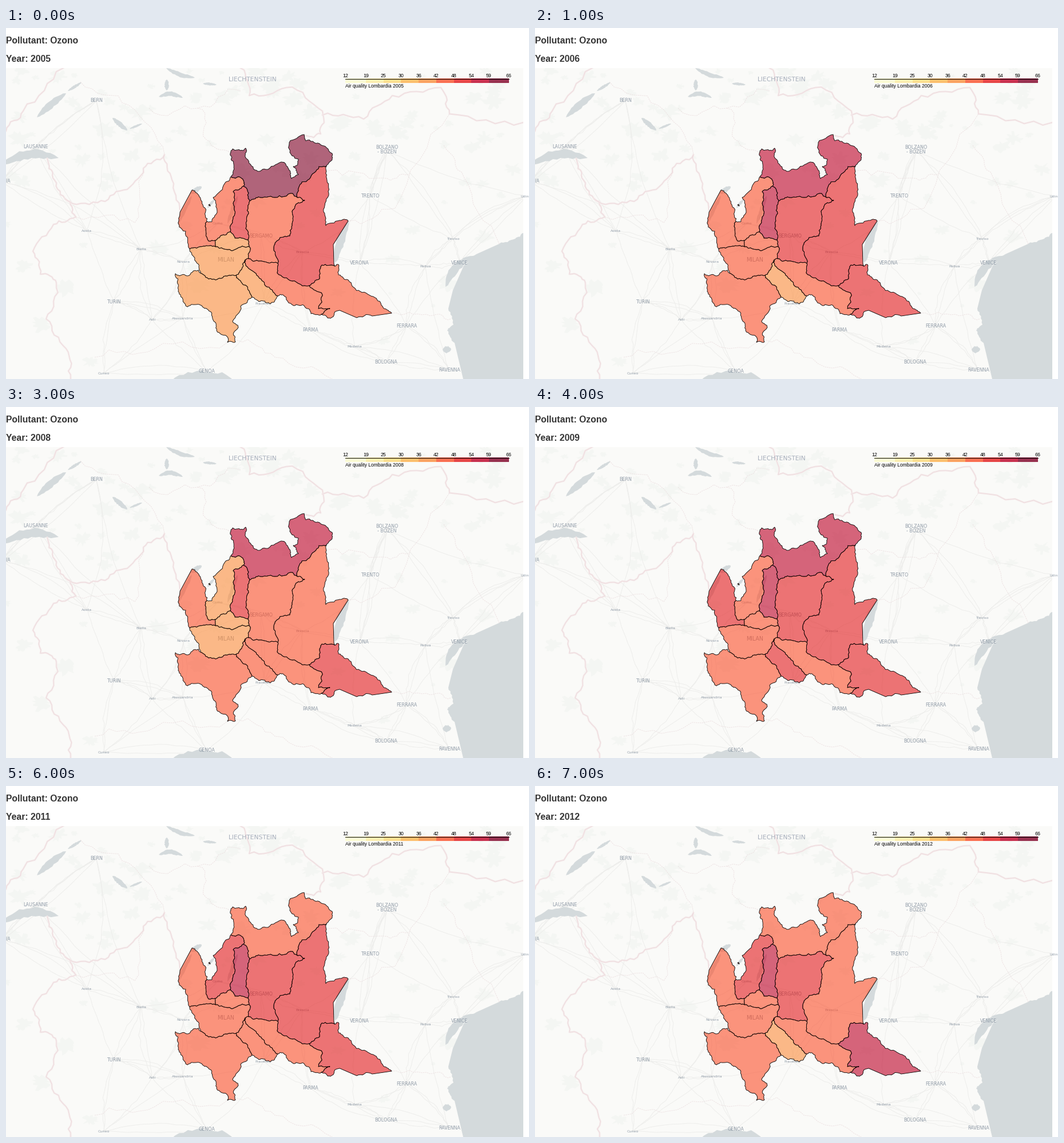
A matplotlib script that plays this animation: 914x613 px, repeating every 8 s.

```python
import numpy as np
import matplotlib.pyplot as plt
from matplotlib.animation import FuncAnimation
from matplotlib.patches import Polygon, Rectangle

W, H, DPI = 914, 613, 64
MAP_W, MAP_TOP = 904, 70
WATER = "#d4dadc"
PALETTE = ["#ffffcc", "#ffeda0", "#fed976", "#feb24c", "#fd8d3c",
           "#fc4e2a", "#e31a1c", "#bd0026", "#800026"]

fig = plt.figure(figsize=(W / DPI, H / DPI), dpi=DPI, facecolor="white")
ax = fig.add_axes([0, 0, 1, 1])
ax.set(xlim=(0, W), ylim=(H, 0))
ax.axis("off")
land = ax.add_patch(Rectangle((0, MAP_TOP), MAP_W, H - MAP_TOP, fc="#fafaf8", zorder=0))
rng = np.random.default_rng(4)


def px(size):
    return size * 72 / DPI


def rough(*pts, amp=2.3, cut=32.5):
    """Break up short segments; longer ones stay straight."""
    noise = np.random.default_rng(int(pts[0][0] * 7 + pts[-1][1]))
    spans = [(p, q, np.hypot(q[0] - p[0], q[1] - p[1]) < cut) for p, q in zip(pts, pts[1:])]
    for _ in range(3):
        halves = []
        for p, q, bumpy in spans:
            dx, dy = q[0] - p[0], q[1] - p[1]
            d = np.hypot(dx, dy) or 1
            k = bumpy * noise.uniform(-1, 1) * min(0.22, amp / d)
            mid = ((p[0] + q[0]) / 2 - k * dy, (p[1] + q[1]) / 2 + k * dx)
            halves += [(p, mid, bumpy), (mid, q, bumpy)]
        spans = halves
    return [s[0] for s in spans] + [pts[-1]]


def ring(*arcs):
    return [p for arc in arcs for p in arc]


def rev(arc):
    return arc[::-1]


def area(pts, color, z=1, **kw):
    patch = ax.add_patch(Polygon(pts, closed=True, fc=color, zorder=z, **kw))
    patch.set_clip_path(land)
    return patch


def line(pts, color, width, z=2, **kw):
    x, y = zip(*pts)
    ax.plot(x, y, color=color, lw=px(width), zorder=z, **kw)[0].set_clip_path(land)


def text(x, y, s, size, color, ha="center", z=4, font="DejaVu Sans", **kw):
    return ax.text(x, y + 0.36 * size, s, fontsize=px(size), color=color, ha=ha,
                   va="baseline", family=font, zorder=z, **kw)


def lake(x0, y0, x1, y1, width, bend=0):
    """Curved spindle from one end to the other."""
    t = np.linspace(0, 1, 16)[:, None]
    p, d = np.array([x0, y0]), np.array([x1 - x0, y1 - y0])
    n = np.array([-d[1], d[0]]) / np.hypot(*d)
    mid = p + t * d + bend * np.sin(np.pi * t) * n
    half = width / 2 * np.sin(np.pi * t) ** 0.6
    side = [mid + s * half * rng.uniform(0.75, 1.15, t.shape) * n for s in (1, -1)]
    area(np.vstack([side[0], side[1][::-1]]), WATER, lw=0)


# Faint woodland
turn = np.linspace(0, 2 * np.pi, 26)
for _ in range(130):
    cx, cy = rng.uniform(0, MAP_W), MAP_TOP + rng.beta(1, 2.2) * 520
    r = rng.uniform(4, 20) * rng.uniform(0.4, 1.2, turn.size)
    area(np.c_[cx + r * np.cos(turn), cy + 0.7 * r * np.sin(turn)], "#f4f6f3", 0.5, lw=0)

# Sea and lakes
area(rough((904, 358), (890, 368), (862, 377), (822, 395), (800, 415), (781, 458),
           (773, 490), (782, 518), (771, 528), (784, 550), (799, 613), (904, 613)),
     WATER, lw=0)
lake(-8, 238, 92, 227, 17, -12)
lake(54, 156, 105, 114, 13, -2)
lake(108, 110, 132, 95, 5)
lake(186, 157, 212, 179, 9)
lake(216, 176, 238, 167, 4)
lake(267, 120, 309, 122, 9, -6)
lake(281, 90, 281, 109, 8)
lake(280, 70, 330, 87, 8, 3)
lake(344, 97, 368, 99, 5)
lake(300, 344, 325, 293, 7, -1)
lake(322, 289, 342, 277, 9)
lake(352, 314, 364, 300, 5)
lake(599, 337, 575, 410, 15, 3)
lake(405, 293, 387, 342, 7)
lake(768, 452, 818, 398, 15, -9)
lake(763, 562, 778, 561, 12)
lake(288, 617, 400, 617, 38)

# Place labels
towns = [("BERN", 158, 126), ("LAUSANNE", 52, 207.5), ("TRENTO", 636, 293),
         ("VERONA", 618, 410), ("VENICE", 793, 410), ("TURIN", 188, 478),
         ("PARMA", 532, 527), ("FERRARA", 700, 520), ("BOLOGNA", 664, 583.5),
         ("RAVENNA", 775, 597.5), ("GENOA", 351, 599.5), ("BERGAMO", 446, 363),
         ("BOLZANO", 666, 208), ("- BOZEN", 666, 216), ("GENEVA", -8, 267.5)]
villages = [("Aosta", 141, 354), ("Biella", 236, 386), ("Novara", 310, 408),
            ("Asti", 256, 509), ("Alessandria", 309, 507), ("Cuneo", 171, 602.5),
            ("Piacenza", 450, 481), ("Modena", 609, 556), ("Padua", 733, 415.5),
            ("Treviso", 781, 367.5), ("Brescia", 518, 391), ("Como", 370, 341),
            ("Udine", 909, 293.5)]
for places, size in ((towns, 8), (villages, 6.4)):
    for name, x, y in places:
        text(x, y, name, size, "#929da9").set_clip_path(land)
text(431, 89.5, "LIECHTENSTEIN", 10.7, "#a5adba")
text(384, 404.5, "MILAN", 9.5, "#929da9")

# Roads link each place to its neighbours
spots = np.array([(x, y) for _, x, y in towns + villages], float)
for p in spots:
    for j in np.argsort(np.hypot(*(spots - p).T))[1:5]:
        q = spots[j]
        t = np.linspace(0, 1, 14)[:, None]
        bend = rng.uniform(-0.09, 0.09) * np.sin(np.pi * t) * (q - p)[::-1] * [-1, 1]
        line(p + t * (q - p) + bend + rng.normal(0, 0.8, (14, 2)), "#ededeb", 0.9, 0.8)

# National and regional boundaries
borders = [
    [(72, 228), (82, 262), (103, 298), (122, 330), (83, 343), (47, 390), (60, 430),
     (88, 445), (70, 508), (105, 560), (113, 613)],
    [(103, 298), (160, 305), (205, 283), (240, 245), (277, 221), (290, 265), (304, 320)],
    [(410, 70), (425, 118), (490, 104), (553, 145), (550, 185), (524, 188)],
    [(553, 152), (625, 159), (675, 118), (760, 104), (775, 150), (904, 165)],
    [(0, 180), (30, 145), (100, 70)],
]
for pts in borders:
    pts = rough(*pts, amp=6, cut=150)
    line(pts, "#f6ecec", 3)
    line(pts, "#ecd9dc", 0.9)
regions = [
    [(130, 94), (215, 135), (277, 221)],
    [(250, 140), (335, 140), (410, 110)],
    [(335, 140), (350, 195), (392, 218)],
    [(122, 330), (225, 340), (240, 245)],
    [(155, 575), (260, 560), (387, 549)],
    [(403, 545), (470, 575), (570, 613)],
    [(674, 498), (735, 500), (778, 508)],
    [(598, 337), (680, 315), (775, 150)],
    [(564, 249), (660, 262), (705, 255)],
    [(765, 205), (800, 260), (862, 377)],
]
for pts in regions:
    line(rough(*pts, amp=9, cut=200), "#ecdfe0", 0.8, dashes=(3, 1.5))

# Points where provincial borders meet
A, B, C, D, E = (393, 260), (415, 276), (426, 302), (509, 296), (560, 241)
F, G, I, J, K = (575, 416), (530, 450), (424, 403), (423, 370), (392, 356)
L, M, N, O, P = (351, 338), (475, 411), (366, 371), (321, 386), (340, 428)
Q, R, S, T, U = (402, 432), (418, 405), (430, 470), (475, 468), (551, 500)
V, X = (425, 382), (366, 382)

# Outer borders
so_out = rough(A, (398, 238), (392, 219), (396, 211), (414, 214), (419, 210), (420, 228),
               (435, 248), (454, 247), (481, 234), (489, 238), (496, 249), (499, 263),
               (511, 256), (502, 242), (508, 240), (511, 229), (499, 222), (495, 200),
               (521, 186), (524, 197), (548, 202), (570, 219), (570, 230), E)
bs_out = rough(E, (561, 266), (564, 292), (555, 321), (559, 345), (578, 337), (598, 337),
               (572, 378), (573, 411), F)
mn_out = rough(F, (581, 413), (581, 431), (600, 443), (619, 460), (645, 471), (658, 486),
               (674, 498), (640, 503), (613, 506), (583, 493), (567, 507), U)
cr_out = rough(U, (533, 499), (520, 484), (503, 485), (484, 466), T)
lo_out = rough(T, (468, 479), (455, 480), (440, 476), S)
pv_out = rough(S, (410, 486), (396, 512), (406, 523), (398, 532), (401, 548), (387, 549),
               (388, 541), (368, 528), (363, 512), (353, 492), (338, 483), (317, 487),
               (305, 466), (301, 448), (296, 429), (317, 433), (336, 423), P)
mi_out = rough(P, (334, 411), O)
va_out = rough(O, (314, 355), (302, 343), (304, 322), (325, 283), (333, 288), (340, 298),
               (349, 320), L)
co_out = rough(L, (360, 338), (369, 322), (362, 296), (380, 275), A)

# Shared borders, named by the two sides
so_co = rough(A, (414, 264), B)
so_lc = rough(B, (424, 288), C)
so_bg = rough(C, (441, 295), (470, 296), (501, 289), D)
so_bs = rough(D, (514, 273), (530, 264), (547, 242), E)
co_lc = rough(B, (397, 286), (397, 306), (397, 330), K)
co_mb = rough(K, (380, 361), N)
co_va = rough(N, (354, 372), (348, 346), L)
lc_bg = rough(C, (424, 324), (419, 350), J)
lc_mb = rough(J, (400, 367), K)
bg_bs = rough(D, (522, 301), (511, 305), (500, 320), (500, 345), (496, 363), (475, 371),
              (468, 385), M)
bg_cr = rough(M, (447, 407), I)
bg_mi = rough(I, V)
bg_mb = rough(V, J)
bs_mn = rough(F, (552, 414), (548, 438), G)
bs_cr = rough(G, (500, 442), (474, 428), M)
mn_cr = rough(U, (566, 490), (546, 490), (552, 479), (553, 466), G)
cr_lo = rough(T, (453, 450), (440, 433), (424, 420), R)
cr_mi = rough(R, I)
lo_pv = rough(S, (412, 445), Q)
lo_mi = rough(Q, (413, 418), R)
pv_mi = rough(P, (360, 439), (384, 433), Q)
mi_va = rough(O, (345, 381), X)
mi_mb = rough(X, (394, 389), (409, 383), V)
mb_va = rough(N, X)

# Order matches the digits in RANKS
rings = [
    ring(va_out, rev(co_va), mb_va, rev(mi_va)),
    ring(so_co, co_lc, co_mb, co_va, co_out),
    ring(so_lc, lc_bg, lc_mb, rev(co_lc)),
    ring(so_out, rev(so_bs), rev(so_bg), rev(so_lc), rev(so_co)),
    ring(so_bg, bg_bs, bg_cr, bg_mi, bg_mb, rev(lc_bg)),
    ring(so_bs, bs_out, bs_mn, bs_cr, rev(bg_bs)),
    ring(rev(lc_mb), rev(bg_mb), rev(mi_mb), rev(mb_va), rev(co_mb)),
    ring(rev(bg_mi), rev(cr_mi), rev(lo_mi), rev(pv_mi), mi_out, mi_va, mi_mb),
    ring(pv_out, pv_mi, rev(lo_pv)),
    ring(rev(cr_lo), lo_out, lo_pv, lo_mi),
    ring(rev(bg_cr), rev(bs_cr), rev(mn_cr), cr_out, cr_lo, cr_mi),
    ring(mn_out, mn_cr, rev(bs_mn)),
    [(354, 309), (356, 308), (357, 311)],
]
RANKS = ["556856444455", "557766555456", "557766445456", "546755445556",
         "657766555656", "557666555556", "567566555556", "567565555457"]
provinces = [area(r, "none", 6, ec="black", lw=px(0.85), joinstyle="round") for r in rings]

# Legend
stops = [593, *np.linspace(629, 844, 8), 879]
values = [12, 19, 25, 30, 36, 42, 48, 54, 59, 66]
for x0, x1, color in zip(stops, stops[1:], PALETTE):
    ax.add_patch(Rectangle((x0, 88), x1 - x0, 8, fc=color, alpha=0.8, lw=0, zorder=8))
for x, v in zip(stops, values):
    text(x, 83, str(v), 8.8, "black", font="Liberation Sans", z=9)
line([(593, 88.5), (879, 88.5)], "black", 1, 9)

caption = text(593, 100.5, "", 8.5, "black", "left", 9, "Liberation Sans")
text(0, 21.5, "Pollutant: Ozono", 15.75, "#333333", "left", 9, "Liberation Sans", weight="bold")
heading = text(0, 53, "", 15.75, "#333333", "left", 9, "Liberation Sans", weight="bold")


def update(i):
    year, ranks = 2005 + i, RANKS[i]
    # The islet follows the second province
    for patch, rank in zip(provinces, ranks + ranks[1]):
        patch.set_facecolor((PALETTE[int(rank)], 0.6))
    heading.set_text(f"Year: {year}")
    caption.set_text(f"Air quality Lombardia {year}")
    return [*provinces, heading, caption]


anim = FuncAnimation(fig, update, frames=len(RANKS), interval=1000, repeat=True,
                     repeat_delay=0, blit=False)
plt.show()
```
